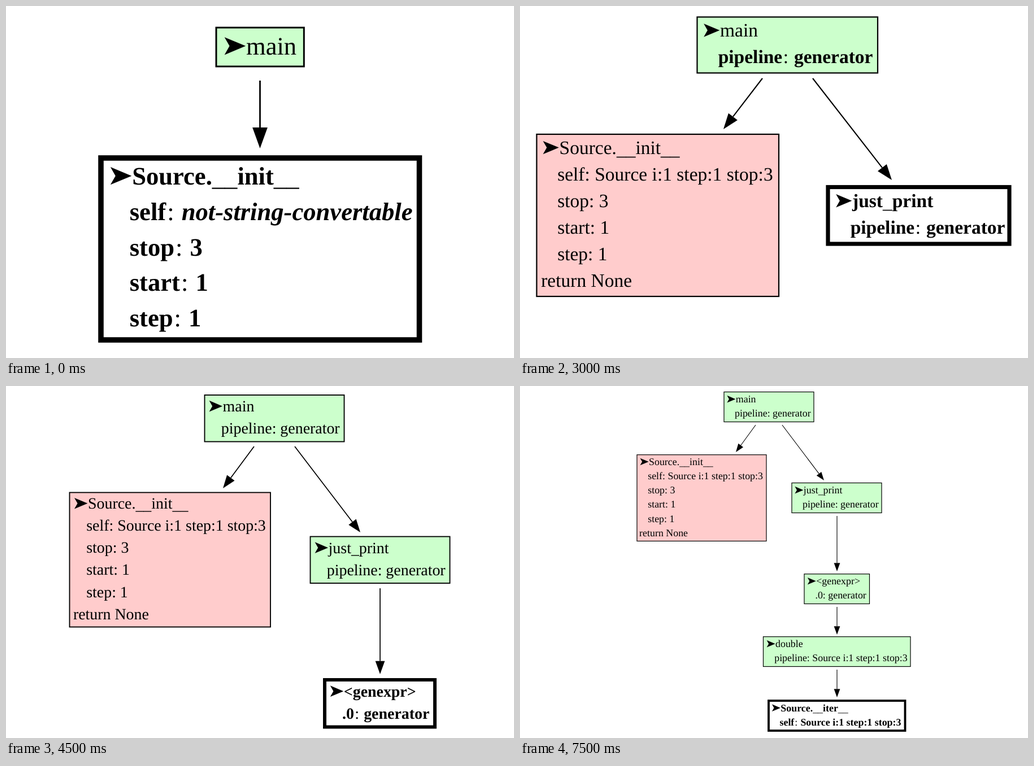
An HTML page for the animation above (8 s loop, 899x623 px).

```html
<!DOCTYPE html>
<html lang="en">
<head>
<meta charset="utf-8">
<title>Call graph</title>
<style>
  html, body { margin: 0; width: 100%; height: 100%; overflow: hidden; background: #fff; }
  svg { display: block; width: 100vw; height: 100vh; }
  text { font-family: "Liberation Serif", "Times New Roman", serif; white-space: pre; text-rendering: geometricPrecision; }
  .bold { font-weight: bold; }
  .italic { font-style: italic; }
  .rule { font-weight: normal; }
</style>
</head>
<body>
<svg id="stage" viewBox="0 0 899 623"></svg>
<script>
const LOOP = 8000, STEP = 1500;
const GREEN = '#ccffcc', PINK = '#ffcccc', ACTIVE = '#ffffff';

// Row markup: *bold*, and *~bold italic*.
const SELF = 'self: Source i:1 step:1 stop:3';
const PIPE = 'pipeline: generator';
const BOLD_PIPE = '*pipeline*: *generator*';
const init = (self = SELF, result = 'None') =>
  ['Source.__init__', self, 'stop: 3', 'start: 1', 'step: 1', 'return ' + result];

// box: fill, left, top, right, bottom, title x, rows, optional row shifts
// edge: x1, y1, x2, y2 (arrow tip)
const scenes = [
  { em: 44.6,
    boxes: [
      [GREEN, 372, 38.2, 527.3, 107, 425, ['main'], [1.5]],
      [ACTIVE, 168, 269, 731.5, 591, 223.2, ['*Source.__init__*',
        '*self*: *~not-string-convertable*', '*stop*: *3*', '*start*: *1*', '*step*: *1*'], [-1]]],
    edges: [[449.5, 132, 449.5, 252]] },
  { em: 41.4,
    boxes: [
      [ACTIVE, 375.5, 33.5, 521.5, 100, 426.8, ['main'], [1.5]],
      [PINK, 153, 243, 745, 599.8, 201.3,
        init('self: *S*o*urce i:1 *st*ep:1 st*o*p:3*', '*None*'), [0, -2, 4, 4, 4, 0]]],
    edges: [[448.5, 123, 448.5, 235]] },
  { em: 33.5,
    boxes: [
      [GREEN, 313.5, 19.5, 633, 118.5, 354, ['main', BOLD_PIPE]],
      [PINK, 29.5, 227, 458, 514, 69.5, init()],
      [ACTIVE, 545, 320.5, 866, 421, 588, ['*just_print*', BOLD_PIPE]]],
    edges: [[429, 128, 360, 218], [518, 128, 658, 308]] },
  { em: 27.9,
    boxes: [
      [GREEN, 351.5, 16, 598.5, 98.5, 383.6, ['main', PIPE]],
      [PINK, 112.5, 188.5, 468, 426.5, 145, init()],
      [GREEN, 538.5, 266.5, 785.5, 349, 570.6, ['just_print', PIPE]],
      [ACTIVE, 564, 520, 759, 603.5, 597.8, ['*<genexpr>*', '*.0*: *generator*']]],
    edges: [[439, 107, 384, 181], [511, 107, 627, 259], [662, 358, 662, 510]] },
  { em: 21.9,
    boxes: [
      [GREEN, 336.5, 12.8, 529.5, 77, 361.4, ['main', PIPE]],
      [PINK, 149, 147.7, 427.5, 334, 174.6, init()],
      [GREEN, 482.7, 209, 676, 273, 507.7, ['just_print', PIPE]],
      [GREEN, 509, 405, 649.5, 469, 534.7, ['<genexpr>', '.0: generator']],
      [ACTIVE, 411.4, 542.4, 747.4, 607.6, 437.8, ['*double*', '*pipeline*: *Source i:1 step:1 stop:3*']]],
    edges: [[405, 84, 361, 142], [461, 84, 551, 203], [579, 280, 579, 400], [579, 476, 579, 535]] },
  { em: 17.9,
    boxes: [
      [GREEN, 361, 10.5, 520, 63.5, 381.8, ['main', PIPE]],
      [PINK, 207, 121.7, 436, 274.5, 228, init()],
      [GREEN, 481, 171.5, 640, 224.5, 501.8, ['just_print', PIPE]],
      [GREEN, 503, 332.7, 618.5, 385.5, 524.2, ['<genexpr>', '.0: generator']],
      [GREEN, 430.5, 443.7, 691, 496.5, 452, ['double', 'pipeline: Source i:1 step:1 stop:3']],
      [ACTIVE, 440, 557, 681.5, 610, 461.3, ['*Source.__iter__*', '*self*: *Source i:1 step:1 stop:3*']]],
    edges: [[417, 69, 382, 117], [464, 69, 538, 167], [561, 230, 561, 328],
      [561, 391, 561, 440], [561, 502, 561, 551]] },
];

const escapeText = text => text.replace(/</g, '&lt;').replace(/>/g, '&gt;');

// Underscores are light and sit a little below their usual place.
const lowerUnderscores = text => text.replace(/(_+)([^_]*)/g,
  '<tspan class="rule" dy=".06em">$1</tspan><tspan dy="-.06em">$2</tspan>');

function spans(row) {
  let dx = 0;
  return row.split('*').map((part, i) => {
    if (!part) return '';
    const italic = part[0] === '~';
    const names = (i % 2 ? 'bold' : '') + (italic ? ' italic' : '');
    const content = lowerUnderscores(escapeText(part.slice(italic ? 1 : 0)));
    const span = `<tspan class="${names}" dx="${dx}em">${content}</tspan>`;
    dx = .045;
    return span;
  }).join('');
}

function drawBox([fill, left, top, right, bottom, titleX, rows, shifts = []], em) {
  const pitch = em * 1.402;
  const firstLine = (top + bottom) / 2 - rows.length * pitch / 2 + .69 * pitch;
  const lines = rows.map((row, i) => {
    const x = i === 0 ? titleX : row.startsWith('return') ? left + .23 * em : titleX - .1 * em;
    const y = firstLine + i * pitch + (shifts[i] || 0);
    return `<text x="${x}" y="${y}">${spans(row)}</text>`;
  });
  const markerY = firstLine + (shifts[0] || 0) - .34 * em;
  return `<rect x="${left}" y="${top}" width="${right - left}" height="${bottom - top}"
      fill="${fill}" stroke="#000" stroke-width="${fill === ACTIVE ? em * 3 / 14 : em / 15}"/>
    <path transform="translate(${titleX} ${markerY}) scale(${em})"
      d="M-.02 0L-.86 .35L-.66 0L-.86 -.35Z"/>` + lines.join('');
}

function drawEdge([x1, y1, x2, y2], em) {
  const angle = Math.atan2(y2 - y1, x2 - x1) * 180 / Math.PI;
  const length = Math.hypot(x2 - x1, y2 - y1);
  const head = .83 * em, half = .3 * em;
  return `<g transform="translate(${x1} ${y1}) rotate(${angle})">
    <path d="M0 0H${length - head}" stroke="#000" stroke-width="${em / 16}"/>
    <path d="M${length} 0l${-head} ${half}v${-2 * half}z"/></g>`;
}

const stage = document.getElementById('stage');
stage.innerHTML = scenes.map(({ em, boxes, edges }) =>
  `<g font-size="${em}">` +
  boxes.map(box => drawBox(box, em)).join('') +
  edges.map(edge => drawEdge(edge, em)).join('') + '</g>').join('');
const groups = [...stage.children];

function render() {
  const current = Math.floor(performance.now() % LOOP / STEP);
  groups.forEach((group, i) => group.style.display = i === current ? '' : 'none');
  requestAnimationFrame(render);
}
render();
</script>
</body>
</html>
```
